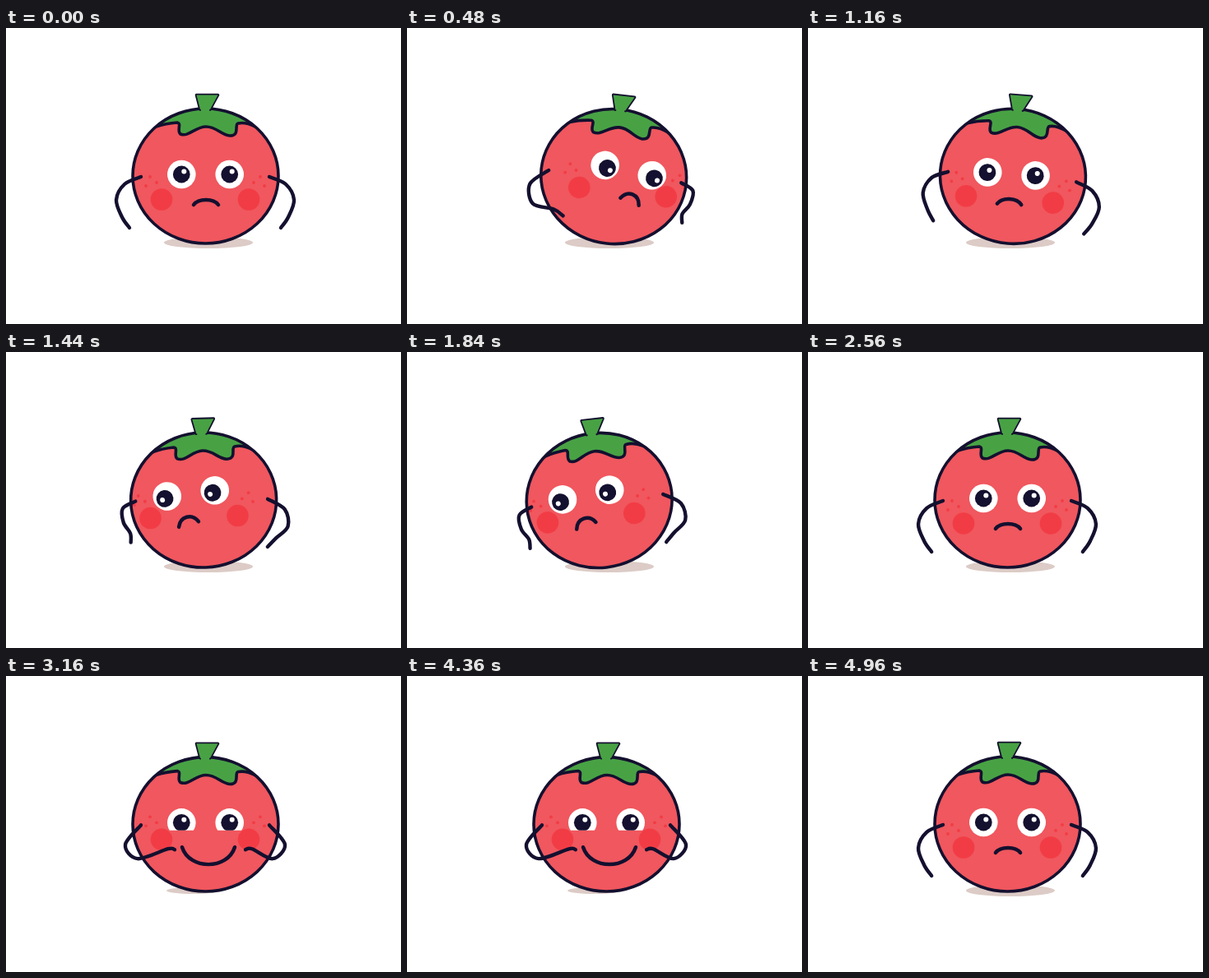
Animation of 480 by 360 pixels, one loop 5000 ms. Source, as an HTML page with a canvas:

```html
<!DOCTYPE html>
<html lang="en">
<head>
<meta charset="utf-8">
<title>Tomato</title>
<style>
  html, body { margin: 0; width: 100%; height: 100%; overflow: hidden; background: #fff; }
  canvas { display: block; }
</style>
</head>
<body>
<canvas id="stage" width="480" height="360"></canvas>
<script>
const ctx = document.getElementById('stage').getContext('2d');
const LOOP = 5000, STEP = 40, AXIS = 242, GROUND = 262;
const INK = '#14102f', RED = '#f0575e', BLUSH = '#f23c45', GREEN = '#48a244';

const mix = (a, b, u) => a + (b - a) * u;
const mixPoints = (a, b, u) => a.map(([x, y], i) => [mix(x, b[i][0], u), mix(y, b[i][1], u)]);

// Eased rise from 0 to 1 between two times.
function ramp(t, start, end) {
  const u = Math.min(1, Math.max(0, (t - start) / (end - start)));
  return u * u * (3 - 2 * u);
}

// Look right, swing to the left, come back, then smile. The body trails the face.
const leanAt = t => 6.2 * (ramp(t, 0, 520) - 2 * ramp(t, 980, 1760) + ramp(t, 1820, 2360));
const turnAt = t => ramp(t, 0, 520) - 2 * ramp(t, 680, 1580) + ramp(t, 1720, 2260);
const joyAt = t => ramp(t, 2540, 3160) - ramp(t, 4340, 4980);

// Left arm from shoulder to hand; the right arm is its mirror image.
const HANGING = [[164, 181], [144, 190], [134, 209], [141, 230], [150, 243]];
const FAR_BENT = [[163, 181], [142, 201], [150, 225], [178, 227], [191, 233]];
const NEAR_BENT = [[159, 179], [144, 187], [146, 204], [154, 216], [153, 227]];
const onCheek = reach => [[164, 181], [145, 205], [160, 222], [reach - 8, 210], [reach, 211]];

function group(draw) {
  ctx.save();
  draw();
  ctx.restore();
}

function pivot(x, y, degrees, scaleX = 1, scaleY = 1) {
  ctx.translate(x, y);
  ctx.rotate(degrees * Math.PI / 180);
  ctx.scale(scaleX, scaleY);
  ctx.translate(-x, -y);
}

function oval(x, y, rx, ry, color) {
  ctx.fillStyle = color;
  ctx.beginPath();
  ctx.ellipse(x, y, rx, ry, 0, 0, 7);
  ctx.fill();
}

const disc = (x, y, r, color) => oval(x, y, r, r, color);

// Smooth stroke through the given points.
function strokeThrough(points, width) {
  const at = i => points[Math.min(points.length - 1, Math.max(0, i))];
  ctx.beginPath();
  ctx.moveTo(...points[0]);
  for (let i = 1; i < points.length; i++) {
    const [before, from, to, after] = [at(i - 2), at(i - 1), at(i), at(i + 1)];
    ctx.bezierCurveTo(
      from[0] + (to[0] - before[0]) / 6, from[1] + (to[1] - before[1]) / 6,
      to[0] - (after[0] - from[0]) / 6, to[1] - (after[1] - from[1]) / 6, ...to);
  }
  ctx.lineWidth = width;
  ctx.stroke();
}

const leafEdge = new Path2D('M182 120Q194 116 208 115C214 116 207 125 212 129' +
  'C222 133 230 120 243 120S261 130 272 131C285 131 277 117 282 116Q291 114 303 120');
const leaf = new Path2D(leafEdge);
leaf.lineTo(303, 90);
leaf.lineTo(182, 90);
const stem = new Path2D('M236 99L231.5 81.5H257.5L248 99');

function drawBody(turn, joy) {
  const skin = new Path2D();
  skin.ellipse(AXIS + 0.5, 180, 88.5, 82, 0, 0, 7);
  ctx.lineWidth = 3.6;
  group(() => {
    ctx.fillStyle = RED;
    ctx.fill(skin);
    ctx.clip(skin);
    group(() => drawCheeks(turn, joy));
    ctx.fillStyle = GREEN;
    ctx.fill(leaf);
    ctx.stroke(leafEdge);
  });
  ctx.stroke(skin);
  ctx.fillStyle = GREEN;
  ctx.stroke(stem);
  ctx.fill(stem);
  ctx.fillRect(237, 96, 10, 5);
}

function drawCheeks(turn, joy) {
  ctx.translate(13.5 * turn, -11 * turn * turn - 10 * joy);
  for (const side of [-1, 1]) {
    const spot = (dx, y, r) => disc(AXIS + side * dx, y, r, BLUSH);
    spot(53, 208.5, 13.3);
    spot(67, 181, 1.9);
    spot(72, 192, 1.9);
    spot(59, 188, 1.9);
  }
}

function drawEye(x, turn, joy) {
  const y = 178, side = Math.abs(turn);
  ctx.beginPath();
  ctx.rect(x - 20, y - 20, 40, mix(38, 29.5, joy));
  ctx.clip();
  disc(x, y, 17.3, '#fff');
  const px = x + 3.5 * turn, py = y + 3 * side;
  disc(px, py, 10.4, INK);
  disc(px + 4 * turn + 3 * (1 - side), py - 3.5 + 5.5 * side, 3, '#fff');
}

function drawMouth(turn, joy) {
  const side = Math.abs(turn);
  const x = mix(243, 246, joy), y = mix(215, 208, joy);
  const half = mix(15, 32, joy), inner = mix(9, 23, joy), bend = mix(-8, 28, joy);
  ctx.translate(9 * turn, 0);
  pivot(x, y, 10 * turn, 1 - 0.2 * side, 1 + 0.6 * side);
  ctx.beginPath();
  ctx.moveTo(x - half, y);
  ctx.bezierCurveTo(x - inner, y + bend, x + inner, y + bend, x + half, y);
}

function drawFace(turn, joy) {
  ctx.translate(17.4 * turn, -7.5 * Math.abs(turn));
  pivot(AXIS, 178, 6.2 * turn);
  for (const x of [213.3, 271.7]) group(() => drawEye(x, turn, joy));
  group(() => drawMouth(turn, joy));
  ctx.lineWidth = 4.5;
  ctx.stroke();
}

// The arm on the far side bends only near the end of a turn.
function drawArm(turn, joy, reach) {
  const posed = turn > 0
    ? mixPoints(HANGING, FAR_BENT, turn ** 7)
    : mixPoints(HANGING, NEAR_BENT, -turn);
  strokeThrough(mixPoints(posed, onCheek(reach), joy), 4.4);
}

function draw(t) {
  const turn = turnAt(t), joy = joyAt(t);
  ctx.fillStyle = '#fff';
  ctx.fillRect(0, 0, 480, 360);
  ctx.strokeStyle = INK;
  ctx.lineCap = ctx.lineJoin = 'round';
  oval(mix(246, 227, joy), 261, mix(54, 32, joy), mix(7, 4, joy), '#dccbc6');
  group(() => {
    pivot(AXIS, GROUND, leanAt(t), 1, 1 - 0.004 * joy);
    drawBody(turn, joy);
    group(() => drawFace(turn, joy));
    drawArm(turn, joy, 205);
    ctx.translate(2 * AXIS, 0);
    ctx.scale(-1, 1);
    drawArm(-turn, joy, 193);
  });
}

function tick() {
  const t = performance.now() % LOOP;
  draw(Math.floor(t / STEP) * STEP);
  requestAnimationFrame(tick);
}
tick();
</script>
</body>
</html>
```
